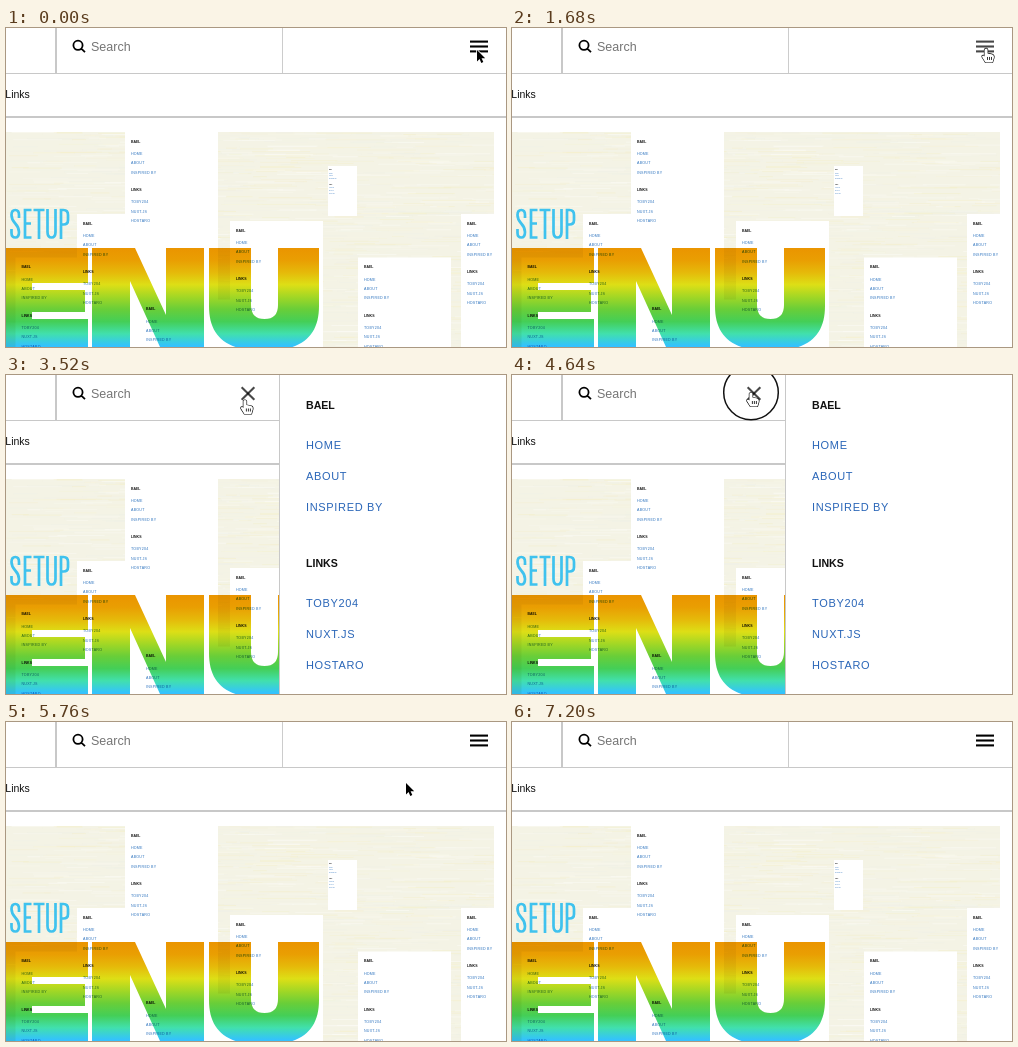
Animation, 500 px wide and 319 px high, one loop 7.28 s. Source, as an HTML page with a canvas:

```html
<!DOCTYPE html>
<html lang="en">
<head>
<meta charset="utf-8">
<title>Menu setup</title>
<style>
html, body { margin: 0; width: 100%; height: 100%; overflow: hidden; background: #fff; }
canvas { display: block; }
</style>
</head>
<body>
<canvas id="stage" width="500" height="319"></canvas>
<script>
const W = 500, H = 319, LOOP = 7280, STEP = 80;
const FONT = '"Liberation Sans", Arial, sans-serif';
const ctx = document.getElementById('stage').getContext('2d');

const GROUPS = [
  ['BAEL', 'HOME', 'ABOUT', 'INSPIRED BY'],
  ['LINKS', 'TOBY204', 'NUXT.JS', 'HOSTARO']
];

const OPEN_AT = 1680, CLOSE_AT = 4720, SLIDE = 840;
const CLICKS = [1520, 4640];

// Pointer tip: time, x, y
const POINTER = [
  [0, 471, 22], [480, 473, 21], [2640, 475, 20], [3440, 239, 25],
  [4480, 239, 17.5], [4800, 239, 17.5], [5760, 400, 61], [6080, 510, 90]
];

const ARROW = new Path2D('M0 0V11.4L2.6 9L4.3 13L6.3 12.1L4.6 8.2H8.2Z');
const HAND = new Path2D('M-1.6 1Q0-1 1.5 1V5L6.3 6Q8.3 6.8 7.8 9.3L6.4 14H-.6L-4 8.6Q-4.4 6.6-2.6 7L-1.6 8Z');
const SETUP = new Path2D(
  'M13 190V187Q13 182 9.3 182T5.5 187C5.5 196 13 195 13 204Q13 209.5 9.3 209.5T5.5 205V201' +
  'M25.5 182H19V209.5H25.5M19 195.5H25' +
  'M27.5 182H38.5M33 182V211' +
  'M41.5 181V204Q41.5 209.5 45.5 209.5T49.5 204V181' +
  'M55 211V182H57.5Q62 182 62 187V192Q62 196.5 57.5 196.5H55');
const ENU = new Path2D(
  'M0 220H82V255H26V262H79V284H26V291H82V319H0Z' +
  'M86 220H129L160 287V220H198V319H154L124 253V319H86Z' +
  'M203 220H245V277Q245 291 258.5 291T272 277V220H313V278C313 308 296 323 258 323S203 308 203 278Z');

function rect(c, color, x, y, w, h) {
  c.fillStyle = color;
  c.fillRect(x, y, w, h);
}

function text(c, str, x, y, size, color, weight = '', spacing = 0) {
  c.font = `${weight} ${size}px ${FONT}`;
  c.letterSpacing = spacing + 'px';
  c.fillStyle = color;
  c.fillText(str, x, y);
}

function menu(c, x, y, scale, color) {
  const pitch = scale < 1 ? scale * .925 : 1;
  GROUPS.forEach((group, g) => group.forEach((label, i) => {
    const rowY = y + (g * 158 + (i && 9 + 31 * i)) * pitch + 4 * scale;
    if (i) text(c, label, x, rowY, 11 * scale, color, '', .66 * scale);
    else text(c, label, x, rowY, 10.6 * scale, '#111', 'bold');
  }));
}

function random(seed) {
  return () => (seed = seed * 16807 % 2147483647) / 2147483647;
}

// Orange through green to cyan
function rainbow(c) {
  const fade = c.createLinearGradient(0, 220, 0, 318);
  for (let u = 0; u <= 1; u += .125) {
    const v = u * u;
    fade.addColorStop(u, `hsl(${38 + 160 * v}, ${100 - 42 * Math.sin(Math.PI * v)}%, ${46 + 14 * v}%)`);
  }
  return fade;
}

function drawPicture(c) {
  const rnd = random(71);
  rect(c, '#f4f3e5', 0, 104, 488, 215);
  for (let i = 0; i < 1200; i++) {
    c.globalAlpha = .1 + rnd() * .25;
    const color = ['#f3ebb8', '#fff', '#ebeee6'][Math.floor(rnd() * 3)];
    const x = rnd() * 488, w = Math.min(10 + rnd() * 50, 488 - x);
    rect(c, color, x, 104 + rnd() * 215, w, 1);
  }
  c.globalAlpha = 1;

  const popups = [[125, 113.5], [77, 195.5], [461, 195.5], [230, 202.5], [15.5, 239], [358, 239], [140, 281]];
  for (const [x, y] of popups) rect(c, '#fff', x - 6, y - 9.5, 93, H);
  rect(c, '#fff', 322, 138, 29, 50);
  for (const [x, y] of popups) menu(c, x, y, .33, '#2d73be');
  menu(c, 323, 141.5, .1, '#2d73be');

  c.strokeStyle = '#3fc2ee';
  c.lineWidth = 2.7;
  c.stroke(SETUP);

  c.globalCompositeOperation = 'multiply';
  c.fillStyle = rainbow(c);
  c.fill(ENU);
  c.globalCompositeOperation = 'source-over';
}

function drawHeader(c) {
  rect(c, '#c8c8c8', 49, 0, 2, 45);
  rect(c, '#ccc', 276, 0, 1, 45);
  rect(c, '#c8c8c8', 0, 45, W, 1);
  rect(c, '#c8c8c8', 0, 88, W, 2);
  c.strokeStyle = '#000';
  c.lineWidth = 1.8;
  c.beginPath();
  c.arc(72, 17.3, 4.6, 0, 7);
  c.moveTo(75.3, 20.6);
  c.lineTo(79, 24.2);
  c.stroke();
  text(c, 'Search', 85, 23, 12.5, '#757575');
  text(c, 'Links', -.7, 70, 10.5, '#111');
}

const page = document.createElement('canvas');
page.width = W;
page.height = H;
const pageCtx = page.getContext('2d');
rect(pageCtx, '#fff', 0, 0, W, H);
drawPicture(pageCtx);
drawHeader(pageCtx);

// The CSS "ease" curve
function ease(u) {
  if (u <= 0) return 0;
  if (u >= 1) return 1;
  const bezier = (s, a, b) => 3 * s * (1 - s) ** 2 * a + 3 * s * s * (1 - s) * b + s ** 3;
  let lo = 0, hi = 1;
  for (let i = 0; i < 20; i++) {
    const mid = (lo + hi) / 2;
    if (bezier(mid, .25, .25) < u) lo = mid; else hi = mid;
  }
  return bezier(lo, .1, 1);
}

function pointerAt(t) {
  const i = POINTER.findIndex(key => key[0] > t);
  if (i < 0) return null;
  const [t0, x0, y0] = POINTER[i - 1], [t1, x1, y1] = POINTER[i];
  const u = (t - t0) / (t1 - t0);
  return [x0 + (x1 - x0) * u, y0 + (y1 - y0) * u];
}

function drawIcon(x, cross, hover) {
  ctx.strokeStyle = '#000';
  ctx.lineWidth = 2.1;
  for (const side of [-1, 0, 1]) {
    ctx.save();
    ctx.globalAlpha = (hover ? .72 : 1) * (side ? 1 : 1 - cross);
    ctx.translate(x, 18.5 + side * 4.9 * (1 - cross));
    ctx.rotate(side * cross * Math.PI / 4);
    ctx.beginPath();
    ctx.moveTo(-9, 0);
    ctx.lineTo(9, 0);
    ctx.stroke();
    ctx.restore();
  }
}

function drawPointer([x, y], hand) {
  const shape = hand ? HAND : ARROW;
  ctx.save();
  ctx.translate(x, y);
  ctx.lineJoin = 'round';
  ctx.lineWidth = hand ? 1.2 : 1.6;
  ctx.strokeStyle = hand ? '#000' : '#fff';
  ctx.fillStyle = hand ? '#fff' : '#000';
  ctx.stroke(shape);
  ctx.fill(shape);
  if (hand) {
    ctx.lineWidth = .8;
    ctx.beginPath();
    for (let dx = 1.4; dx < 6; dx += 2) {
      ctx.moveTo(dx, 8.5);
      ctx.lineTo(dx, 11.5);
    }
    ctx.stroke();
  }
  ctx.restore();
}

function draw(t) {
  const open = ease((t - OPEN_AT) / SLIDE) - ease((t - CLOSE_AT) / SLIDE);
  const cross = Math.min(1, open * 1.3);
  const left = 504 - 231 * open, iconX = left - 31;
  const tip = pointerAt(t);
  const hand = tip && t >= STEP && Math.abs(tip[0] - iconX) < 14 && Math.abs(tip[1] - 18) < 12;

  ctx.drawImage(page, 0, 0);
  if (open > 0) {
    rect(ctx, '#fff', left, 0, W, H);
    rect(ctx, '#c8c8c8', left, 0, 1, H);
    menu(ctx, left + 27, 30, 1, '#2a66b8');
  }
  drawIcon(iconX, cross, hand);
  if (CLICKS.some(start => t >= start && t < start + 2 * STEP)) {
    ctx.strokeStyle = '#111';
    ctx.lineWidth = 1.5;
    ctx.beginPath();
    ctx.arc(...tip, 27.3, 0, 7);
    ctx.stroke();
  }
  if (tip) drawPointer(tip, hand);
}

function tick() {
  const beat = n => Math.floor(n / 6.4);
  let n = Math.floor(performance.now() % LOOP / STEP);
  if (beat(n + 1) > beat(n)) n--;
  draw(n * STEP);
  requestAnimationFrame(tick);
}
tick();
</script>
</body>
</html>
```
